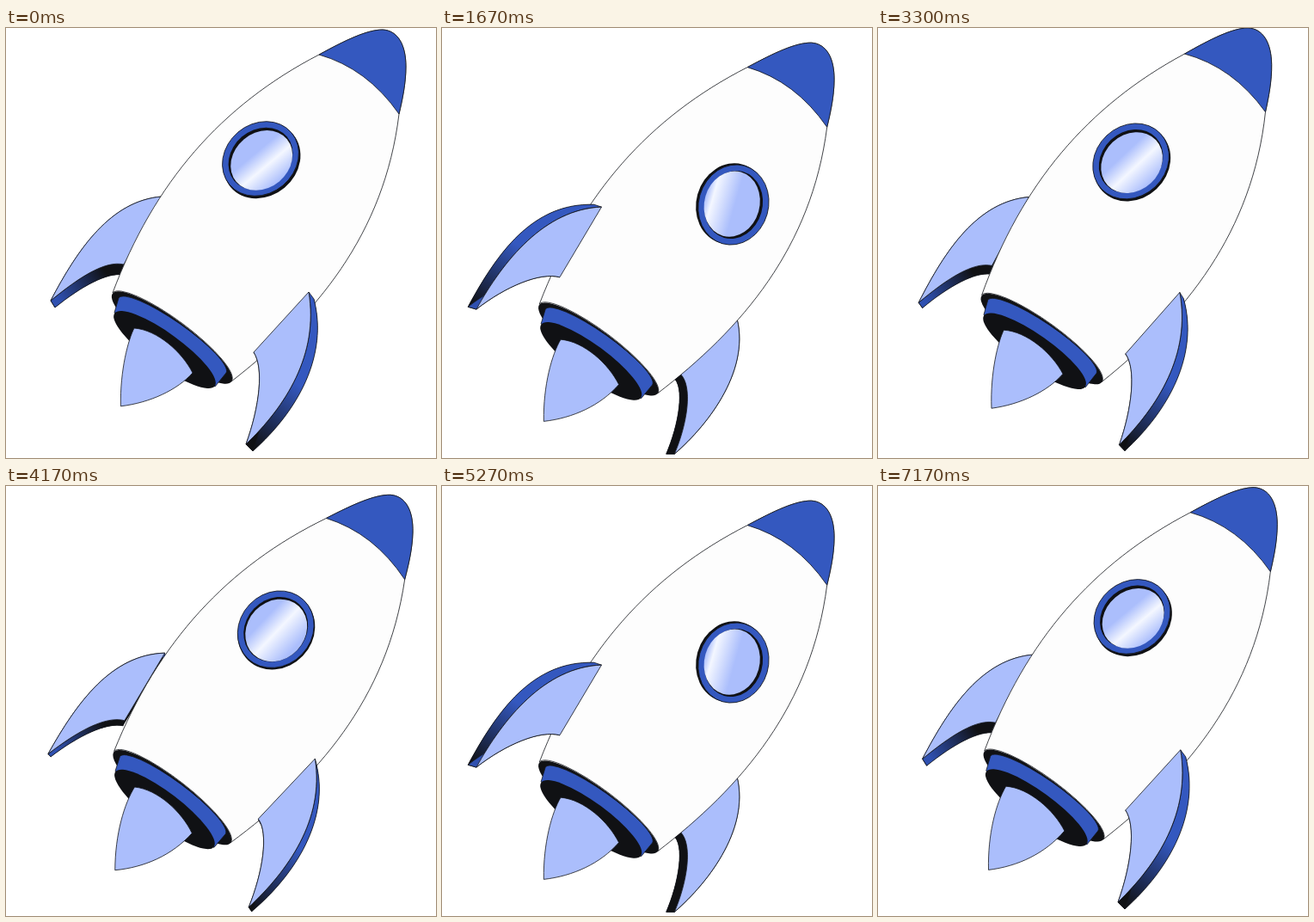
These frames come from a looping animation (500x500 px, 7.21 s). An HTML page:

```html
<!DOCTYPE html>
<html lang="en">
<head>
<meta charset="utf-8">
<title>Rocket</title>
<style>
  html, body { margin: 0; width: 100%; height: 100%; overflow: hidden; background: #fff; }
  svg { display: block; width: 100vw; height: 100vh; }
  .line { stroke: #15171c; stroke-width: .8; stroke-linejoin: round; }
  .light { fill: #abbefc; }
  .blue { fill: #3458bf; }
  .dark { fill: #101114; }
</style>
</head>
<body>
<svg viewBox="0 0 500 500">
  <defs>
    <linearGradient id="leftLow" gradientUnits="userSpaceOnUse" x1="62" y1="318" x2="116" y2="284">
      <stop stop-color="#2f50b0"/><stop offset="1" stop-color="#101114"/>
    </linearGradient>
    <linearGradient id="leftTop" gradientUnits="userSpaceOnUse" x1="46" y1="310" x2="92" y2="236">
      <stop stop-color="#101114"/><stop offset="1" stop-color="#3458bf"/>
    </linearGradient>
    <linearGradient id="rightTop" gradientUnits="userSpaceOnUse" x1="286" y1="486" x2="340" y2="415">
      <stop stop-color="#101114"/><stop offset="1" stop-color="#3458bf"/>
    </linearGradient>
    <linearGradient id="shine" x1="0" y1="0" x2="0" y2="1">
      <stop stop-color="#abbefc"/><stop stop-color="#f4f7ff"/><stop offset="1" stop-color="#abbefc"/>
    </linearGradient>
  </defs>
  <g id="rocket">
    <g id="hull">
      <path class="line" fill="#fdfdfd" d="M364 31C395 14 420 2 438 2C456 3 465 20 465 45C465 64 461 83 457 100C440 240 360 335 262 411A86 20 36.5 0 0 124 308C172 180 250 90 364 31Z"/>
      <path class="line blue" d="M364 31C395 14 420 2 438 2C456 3 465 20 465 45C465 64 461 83 457 100Q420 47 364 31Z"/>
      <ellipse class="dark" rx="86" ry="20" transform="translate(193 360) rotate(36.5)"/>
      <path class="line blue" d="M131 314A76 16 35 0 1 256 401L243 417L126 331Z"/>
      <ellipse class="dark" rx="72" ry="19" transform="translate(184.5 374) rotate(36)"/>
      <path id="flame" class="line light"/>
      <g id="port">
        <ellipse id="rim" class="dark"/>
        <ellipse id="ring" class="blue line"/>
        <ellipse id="hole" class="dark"/>
        <ellipse id="glass" fill="url(#shine)"/>
      </g>
    </g>
  </g>
</svg>
<script>
const $ = id => document.getElementById(id);
const rocket = $('rocket'), hull = $('hull');
const LOOP = 7210, STEP = 100 / 3, SWAY = 108;
const flare = [81, 79, 79.3, 82, 84.5, 86.7, 88.5, 90, 89];

// Each sheet: tip, 2 controls, top, inner, 2 controls, at both ends of the
// roll, then the outward shift halfway between them.
const fins = [
  {
    fills: ['url(#leftTop)', 'url(#leftLow)'], frontAt: -1,
    sheets: [
      { a: [52,317, 84,256, 122,201, 181,196, 137,275, 115,270, 85,290],
        b: [41,312, 74,250, 115,190, 187,192, 139,274, 115,268, 75,285],
        mid: [-3, -4] },
      { a: [57,325, 89,265, 126,210, 183,207, 136,287, 118,284, 88,300],
        b: [51,315, 82,258, 130,198, 196,195, 148,277, 125,271, 85,288],
        mid: [-7, -9.5] }
    ]
  },
  {
    fills: ['url(#rightTop)', '#101114'], frontAt: 1,
    sheets: [
      { a: [279,484, 325,440, 364,380, 352,307, 288,377, 300,395, 295,440],
        b: [272,481, 310,440, 360,380, 344,315, 279,392, 294,402, 286,448],
        mid: [11, 3] },
      { a: [287,492, 340,445, 375,380, 358,315, 294,385, 306,403, 303,448],
        b: [282,481, 322,446, 372,380, 352,318, 288,388, 303,402, 297,445],
        mid: [4, 1] }
    ]
  }
];

function addPath(parent, cls, fill) {
  const p = document.createElementNS('http://www.w3.org/2000/svg', 'path');
  p.setAttribute('class', cls);
  if (fill) p.setAttribute('fill', fill);
  return parent.appendChild(p);
}

for (const fin of fins) {
  fin.g = document.createElementNS('http://www.w3.org/2000/svg', 'g');
  rocket.appendChild(fin.g);
  fin.back = addPath(fin.g, 'dark');
  fin.sides = fin.fills.map(f => addPath(fin.g, 'line', f));
  fin.face = addPath(fin.g, 'line light');
}

function set(el, attrs) {
  for (const k in attrs) el.setAttribute(k, attrs[k]);
}
const mix = (a, b, c) => (a + b) / 2 + (a - b) / 2 * c;

// Points of a sheet as "x y" strings for roll c in -1..1
function pose({ a, b, mid }, c) {
  const pts = [];
  for (let i = 0; i < a.length; i += 2) {
    const [x, y] = [0, 1].map(j => mix(a[i + j], b[i + j], c) + mid[j] * (1 - c * c));
    pts.push(x.toFixed(2) + ' ' + y.toFixed(2));
  }
  return pts;
}
const outline = p => `M${p[0]}C${p[1]} ${p[2]} ${p[3]}L${p[4]}C${p[5]} ${p[6]} ${p[0]}Z`;
const topSide = (p, q) =>
  `M${p[0]}C${p[1]} ${p[2]} ${p[3]}L${q[3]}C${q[2]} ${q[1]} ${q[0]}Z`;
const lowSide = (p, q) =>
  `M${p[4]}C${p[5]} ${p[6]} ${p[0]}L${q[0]}C${q[6]} ${q[5]} ${q[4]}Z`;

function drawFin(fin, c) {
  const [p, q] = fin.sheets.map(s => pose(s, c));
  set(fin.back, { d: outline(c > 0 ? q : p) });
  set(fin.sides[0], { d: topSide(p, q) });
  set(fin.sides[1], { d: lowSide(p, q) });
  set(fin.face, { d: outline(c > 0 ? p : q) });
  const inFront = c * fin.frontAt > 0;
  rocket.insertBefore(fin.g, inFront ? null : rocket.firstChild);
}

function drawPort(c) {
  const bow = 1 - c * c;
  const x = mix(296, 349.6, c) + .7 * bow, y = mix(152, 191.5, c) + bow;
  const rx = 47.5, ry = 41 + 2.2 * bow, turn = -57.5 + 17.5 * c;
  const oval = (id, grow, dx, dy) => set($(id), {
    rx: rx + grow, ry: ry + grow,
    transform: `translate(${x + dx} ${y + dy}) rotate(${turn})`
  });
  const dx = -.4 + 1.9 * c, dy = .6 + 1.8 * c;
  oval('rim', 0, dx, dy);
  oval('ring', -.5, 0, 0);
  oval('hole', -7.5, 0, 0);
  oval('glass', -9, dx * .8, dy * .8);

  const s = $('shine').children, at = .38 + .25 * c;
  s[0].setAttribute('offset', Math.max(0, at - .3));
  s[1].setAttribute('offset', at);
  s[2].setAttribute('offset', Math.min(1, at + .42));
}

function drawFlame(len) {
  const x = 182 - .6 * len, y = 375 + .8 * len;
  set($('flame'), {
    d: `M149 349C${x + 9} ${y - 78} ${x - 1} ${y - 42} ${x} ${y}` +
       `C${x + 34} ${y - 4} ${x + 66} ${y - 19} 217 401C205 377 176 351 149 349Z`
  });
}

function draw() {
  const t = performance.now() % LOOP;
  const k = Math.min(215, Math.floor((t + 3.4) / STEP));
  const phase = 2 * Math.PI * k / SWAY;
  const c = Math.cos(phase), s = Math.sin(phase);
  set(rocket, {
    transform: `rotate(${1.7 * s} 233 483) translate(${6 * (c - 1)} ${7 * (1 - c)})`
  });
  for (const fin of fins) drawFin(fin, c);
  drawPort(c);
  drawFlame(flare[k % flare.length]);
  requestAnimationFrame(draw);
}
draw();
</script>
</body>
</html>
```
